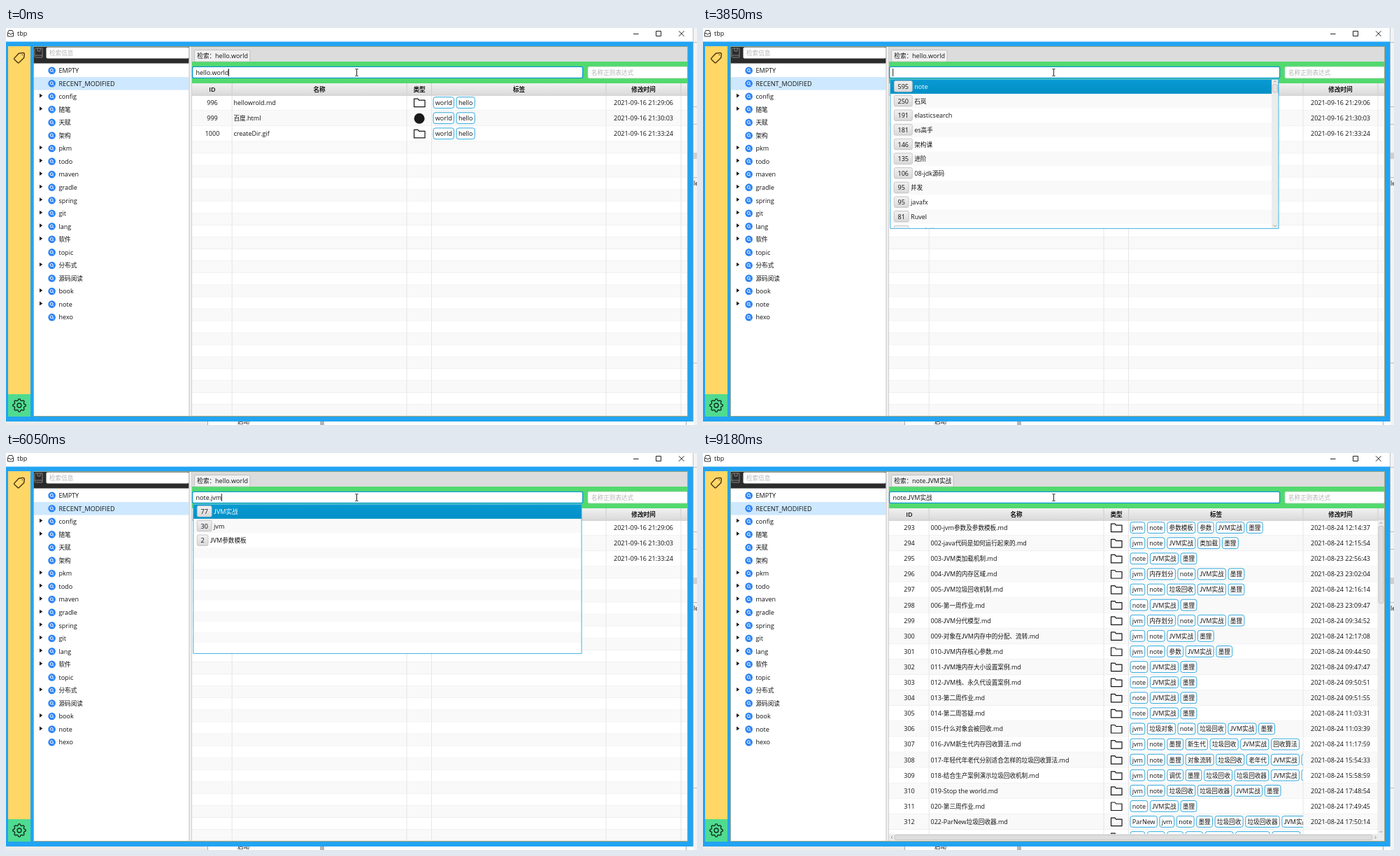
These frames come from a looping animation (988x567 px, 9510 ms). An HTML page:

```html
<!DOCTYPE html>
<html lang="zh-CN">
<head>
<meta charset="utf-8">
<style>
html, body { margin: 0; width: 100%; height: 100%; overflow: hidden; background: #fff }
svg { display: block }
text { font: 9px "Open Sans", "Noto Sans CJK SC", "Noto Sans CJK", sans-serif; fill: #111; white-space: pre }
.han { font-size: 8.6px }
.cap { font-family: Lato, sans-serif }
.bold { font-weight: 600 }
.mid { text-anchor: middle }
.hint { fill: #b4b4b4 }
.light { fill: #fff }
#probe { visibility: hidden }
</style>
</head>
<body>
<svg id="stage" width="988" height="567" viewBox="0 0 988 567">
  <defs>
    <linearGradient id="head" x2="0" y2="1"><stop stop-color="#f1f1f1"/><stop offset="1" stop-color="#d9d9d9"/></linearGradient>
    <linearGradient id="pick" x2="0" y2="1"><stop stop-color="#0a9ad2"/><stop offset="1" stop-color="#0090c6"/></linearGradient>
    <clipPath id="tagClip"><path d="M609 96h249v448H609z"/></clipPath>
    <clipPath id="bodyClip"><path d="M266 96h699v448H266z"/></clipPath>
    <clipPath id="popClip"><path d="M268 73h555v212.6H268z"/></clipPath>
  </defs>
  <text id="probe"></text>
  <g id="frame"></g>
  <g id="content"></g>
  <g fill="none" stroke="#222"><path d="M499.5 58.5h1.5l.5 .7.5-.7h1.5M501.5 59v9M499.5 68.5h1.5l.5-.7.5 .7h1.5"/></g>
</svg>
<script>
const $ = id => document.getElementById(id);

// Chinese runs are set slightly smaller; the J stands on the baseline.
const markup = s => s
  .replace(/[\u3001\u4e00-\u9fff\uff1a]+/g, '<tspan class="han">$&</tspan>')
  .replace(/J/g, '<tspan class="cap">J</tspan>');
function textWidth(s) {
  $('probe').innerHTML = markup(s);
  return s ? $('probe').getComputedTextLength() : 0;
}
const rect = (x, y, w, h, fill, extra = '') =>
  `<rect x="${x}" y="${y}" width="${w}" height="${h}" fill="${fill}" ${extra}/>`;
const path = (d, stroke, width = 1, fill = 'none') =>
  `<path d="${d}" fill="${fill}" stroke="${stroke}" stroke-width="${width}" stroke-linejoin="round"/>`;
const text = (x, y, s, cls = '') => `<text x="${x}" y="${y + 3.3}" class="${cls}">${markup(s)}</text>`;
const clip = (id, body) => `<g clip-path="url(#${id})">${body}</g>`;

// ---- window frame, sidebar and tree ----
const TREE = ('EMPTY RECENT_MODIFIED +config +随笔 天赋 架构 +pkm +todo +maven +gradle +spring ' +
  '+git +lang +软件 topic +分布式 源码阅读 +book +note hexo').split(' ');

function gear(cx, cy) {
  let d = '';
  for (let i = 0; i < 32; i++) {
    const a = (i - .5) * Math.PI / 16, r = i % 4 < 2 ? 9.2 : 7.2;
    d += (i ? 'L' : 'M') + (cx + r * Math.cos(a)).toFixed(1) + ' ' + (cy + r * Math.sin(a)).toFixed(1);
  }
  return path(d + 'z', '#14291d', 1.3) + `<circle cx="${cx}" cy="${cy}" r="3" fill="none" stroke="#14291d" stroke-width="1.3"/>`;
}

function treeItem(item, i) {
  const y = 60.7 + i * 18.55, name = item.replace('+', '');
  return (i === 1 ? rect(40, y - 9.2, 221.5, 18.5, '#cde8ff') : '') +
    (name !== item ? `<path d="M48 ${y - 4}l4.2 2.8-4.2 2.8z" fill="#111"/>` : '') +
    `<circle cx="65.6" cy="${y}" r="5.3" fill="#2d83f4"/>` +
    `<circle cx="65.2" cy="${y - .4}" r="2" fill="none" stroke="#fff"/>` +
    path(`M66.7 ${y + 1.1}l1.6 1.6`, '#fff') + text(75.5, y, name);
}

function drawFrame() {
  return rect(983, 0, 5, 567, '#f3f3f3') + rect(983, 178, 5, 9, '#cfcfcf') +
    path('M983 20.5h5M983 112.5h5M983 137.5h5M983 213.5h5M983 478.5h5', '#bbb') + text(983, 222, 'le') +
    rect(0, 562, 289, 5, '#ececec') + rect(288, 562, 1, 5, '#aaa') + text(331, 561.5, '启动') +
    rect(449, 562, 6, 5, '#b5b5b5') + rect(972, 562, 1, 5, '#aaa') +
    path('M2.5 6.5l1.5-3h5l1.5 3v5.5h-8zM2.5 7.5h2.5l.7 1.5h2l.7-1.5h2.3', '#333') + text(16, 8, 'tbp') +
    path('M897 8.5h7.5M929.5 4.5h7v7h-7zM962 4.3l7.5 7.5M969.5 4.3l-7.5 7.5', '#222') +
    rect(0, 19.5, 982.5, 542.5, '#22a4f2') + path('M982.5 0v562', '#8a9aa5', .6) +
    rect(3, 26, 32, 497, '#ffd766') + rect(3, 523, 32, 32, '#4fdb90') +
    path('M18.3 36.2l6-.8q2 0 2 1.8l-.6 5.4-7.2 6.8q-.8.8-1.7 0l-4.9-4.6q-.8-.8 0-1.7z', '#4a3314', 1.4) +
    '<circle cx="23.3" cy="38.3" r=".8" fill="#4a3314"/>' + gear(19, 539) +
    rect(39, 26.5, 936, 528, '#fff') +
    rect(39, 27, 223, 23.5, '#2b2b2b') + rect(57.5, 27.5, 204, 16, '#fff', 'rx="2"') + text(62, 35.6, '检索信息', 'hint') +
    path('M42.5 29h9.5v13h-9.5q-1.5 0-1.5-1.5v-10q0-1.5 1.5-1.5M41.5 39h10.5M45 29v4h4v-4', '#858585') +
    TREE.map(treeItem).join('') +
    rect(261.5, 27, 4.5, 527.5, '#f0f0f0') + path('M262 27v527M265.7 27v527', '#bcbcbc', .8) +
    rect(266, 27, 708.5, 22, '#dcdcdc') +
    rect(266, 48, 708.5, 31, '#52d96e') +
    rect(832, 55.2, 142.5, 16.6, '#fff', 'rx="2" stroke="#c5d5c5" stroke-width=".7"') +
    text(837, 63.4, '名称正则表达式', 'hint') +
    path('M39.5 26.5h935v528h-935z', '#9d9a67', .8);
}

// ---- table ----
const BEFORE = `996|hellowrold|world hello|09-16 21:29:06
999|百度.html|world hello|09-16 21:30:03
1000|createDir.gif|world hello|09-16 21:33:24`;
const AFTER = `293|000-jvm参数及参数模板|jvm note 参数模板 参数 JVM实战 墨狸|08-24 12:14:37
294|002-java代码是如何运行起来的|jvm note JVM实战 类加载 墨狸|08-24 12:15:54
295|003-JVM类加载机制|note JVM实战 墨狸|08-23 22:56:43
296|004-JVM的内存区域|jvm 内存划分 note JVM实战 墨狸|08-23 23:02:04
297|005-JVM垃圾回收机制|jvm note 垃圾回收 JVM实战 墨狸|08-24 12:16:14
298|006-第一周作业|note JVM实战 墨狸|08-23 23:09:47
299|008-JVM分代模型|jvm 内存划分 note JVM实战 墨狸|08-24 09:34:52
300|009-对象在JVM内存中的分配、流转|jvm note JVM实战 墨狸|08-24 12:17:08
301|010-JVM内存核心参数|jvm note 参数 JVM实战 墨狸|08-24 09:44:50
302|011-JVM堆内存大小设置案例|note JVM实战 墨狸|08-24 09:47:47
303|012-JVM栈、永久代设置案例|note JVM实战 墨狸|08-24 09:50:51
304|013-第二周作业|note JVM实战 墨狸|08-24 09:51:55
305|014-第二周答疑|note JVM实战 墨狸|08-24 11:03:31
306|015-什么对象会被回收|jvm 垃圾对象 note 垃圾回收 JVM实战 墨狸|08-24 11:03:39
307|016-JVM新生代内存回收算法|jvm note 墨狸 新生代 垃圾回收 JVM实战 回收算法|08-24 11:17:59
308|017-年轻代年老代分别适合怎样的垃圾回收算法|jvm note 墨狸 对象流转 垃圾回收 老年代 JVM实战 算法|08-24 15:54:33
309|018-结合生产案例演示垃圾回收机制|jvm note 调优 墨狸 垃圾回收 垃圾回收器 JVM实战 案例|08-24 15:58:59
310|019-Stop the world|jvm note 垃圾回收 垃圾回收器 JVM实战 墨狸|08-24 17:48:54
311|020-第三周作业|note JVM实战 墨狸|08-24 17:49:45
312|022-ParNew垃圾回收器|ParNew jvm note 墨狸 垃圾回收 垃圾回收器 JVM实战|08-24 17:50:14
313|023-CMS垃圾回收器|jvm note 墨狸 CMS 垃圾回收 垃圾回收器 JVM实战|08-24 17:52:20`;
const COLUMNS = [[295, 'ID'], [448, '名称'], [591, '类型'], [733.5, '标签'], [911.5, '修改时间']];

function tagList(names, y) {
  let x = 611;
  return names.split(' ').map(name => {
    const w = textWidth(name) + 5.6;
    const tag = rect(x, y - 8, w, 15.8, '#fff', 'rx="3" stroke="#2fa8dc"') + text(x + 2.8, y, name);
    x += w + 3.6;
    return tag;
  }).join('');
}

function tableRow(line, i) {
  const [id, name, tags, date] = line.split('|'), y = 106.7 + i * 22.1;
  const icon = name.endsWith('.html') ? `<circle cx="591" cy="${y + .5}" r="7.5" fill="#1a1a1a"/>`
    : path(`M583.5 ${y - 5.5}h5.5l1.5 2h8.5v9.5h-15.5z`, '#151515', 1.2);
  return text(295, y, id, 'mid') + text(325.5, y, /\.\w+$/.test(name) ? name : name + '.md') + icon +
    clip('tagClip', tagList(tags, y)) + text(911.5, y, '2021-' + date, 'mid');
}

function drawTable(data) {
  const lines = data.split('\n'), full = lines.length > 5;
  let out = rect(266, 96, 708.5, 458.5, '#fff');
  for (let i = 0, y = 96; y < 554; i++) {
    const h = Math.min(i < lines.length ? 22.1 : 17.08, 554 - y);
    out += rect(266, y, 708.5, h, i % 2 ? '#f9f9f9' : '#fff') + rect(266, y + h - .8, 708.5, .8, '#ededed');
    y += h;
  }
  out += rect(266, 79, 708.5, 17.3, 'url(#head)') +
    path('M323.2 79v475M573 79v475M608.5 79v475M858 79v475M965 79v475', '#e6e6e6') +
    path('M323.2 79v17M573 79v17M608.5 79v17M858 79v17M965 79v17M266 96.3h708', '#c8c8c8', .8) +
    COLUMNS.map(([x, s]) => text(x, 88, s, 'mid bold')).join('') +
    clip('bodyClip', lines.map(tableRow).join(''));
  if (full) {
    out += rect(965, 96, 9.5, 448, '#ececec') + rect(966, 104.5, 7, 110, '#dedede', 'rx="2" stroke="#bbb" stroke-width=".7"') +
      rect(266, 544, 708.5, 10, '#ececec') + rect(274, 545.5, 683, 7, '#dedede', 'rx="2" stroke="#bbb" stroke-width=".7"') +
      path('M967.5 101l2-2 2 2M967.5 540l2 2 2-2M271 547l-2 2 2 2M960.5 547l2 2-2 2', '#888', .9);
  }
  return out + path('M974.5 79v475.5H266', '#9d9a67', .8);
}

// ---- suggestion popup ----
const ALL = '595 note,250 石岚,191 elasticsearch,181 es高手,146 架构课,135 进阶,106 08-jdk源码,95 并发,95 javafx,81 Ruvel,77 JVM实战';
const UNDER_NOTE = '248 石岚,181 elasticsearch,181 es高手,146 架构课,135 进阶,106 08-jdk源码,92 并发,81 javafx,81 Ruvel,77 JVM实战,70 spring';
const HE = '30 theory,9 shell,6 hexo,3 hello,1 timingWheel,1 cache';
const H = '191 elasticsearch,' + HE;
const HEL = '9 shell,3 hello';
const JV = '77 JVM实战,30 jvm,2 JVM参数模板';
const J = '106 08-jdk源码,81 javafx,' + JV;

function drawPopup(list) {
  const items = list.split(','), pitch = 20.65, scrolls = items.length > 10;
  let body = rect(268, 73, 555, 213, '#fff');
  for (let i = 0, y = 73.3; y < 286; i++) {
    const h = i < items.length ? pitch : 15.1;
    body += rect(268, y, 555, h, i === 0 ? 'url(#pick)' : i % 2 ? '#f9f9f9' : '#fff');
    y += h;
  }
  items.forEach((item, i) => {
    const [count, name] = item.split(' '), y = 83.6 + i * pitch, w = textWidth(count) + 11;
    body += rect(273.3, y - 8, w - .5, 15.5, 'url(#head)', 'rx="2" stroke="#bdbdbd" stroke-width=".8"') +
      text(273 + w / 2, y, count, 'mid') + text(275.8 + w, y, name, i ? '' : 'light');
  });
  if (scrolls) {
    body += rect(813, 73.5, 9.5, 212.5, '#ececec') + rect(814.3, 80.5, 7, 11.5, '#e2e2e2', 'rx="2" stroke="#b5b5b5" stroke-width=".7"') +
      path('M815.8 77.5l2-2 2 2M815.8 281.5l2 2 2-2', '#888', .9);
  }
  return clip('popClip', body) + path('M267.8 73h555.2v213.4H267.8z', '#3fb4e2');
}

// ---- timeline: start ms, typed text, caret shown, suggestions ----
const STEPS = [
  [0, 'hello.world', 1], [470, 'hello.world', 0],
  [860, 'hello.worl', 1, '3 world'], [1060, 'hello.wor', 1, '3 world'], [1260, 'hello.wo', 1, '3 world'],
  [1410, 'hello.w', 1, '3 world'], [1530, 'hello.', 1, '3 world'], [1670, 'hello', 1, '3 hello'],
  [1870, 'hell', 1, HEL], [2000, 'hel', 1, HEL], [2130, 'he', 1, HE], [2330, 'h', 1, H],
  [2460, '', 1, ALL], [3360, '', 0, ALL], [3850, '', 1, ALL],
  [4040, 'note', 1], [4380, 'note.', 1, UNDER_NOTE],
  [4850, 'note.j', 1, J], [4940, 'note.jv', 1, JV], [5040, 'note.jvm', 1, JV],
  [5580, 'note.jvm', 0, JV], [6050, 'note.jvm', 1, JV],
  [6180, 'note.JVM实战', 1], [6640, 'note.JVM实战', 0], [6770, 'note.JVM实战', 1],
  [7240, 'note.JVM实战', 0], [7710, 'note.JVM实战', 1], [8190, 'note.JVM实战', 0],
  [8700, 'note.JVM实战', 1], [9180, 'note.JVM实战', 0]
];
const LOOP = 9510, LOADED = 6770;

function drawContent([start, typed, caret, list]) {
  const loaded = start >= LOADED, title = '检索：' + (loaded ? 'note.JVM实战' : 'hello.world');
  const caretX = 271.5 + textWidth(typed);
  return rect(269.5, 31.5, textWidth(title) + 6.8, 16.5, '#f1f1f1', 'rx="1.5" stroke="#b9b9b9" stroke-width=".8"') +
    text(273.3, 39.8, title) +
    rect(266.6, 55.4, 558, 16, '#fff', 'rx="2" stroke="#109bd3" stroke-width="1.4"') +
    text(271.5, 63.2, typed) + (caret ? rect(caretX - .4, 58, 1, 11, '#222') : '') +
    drawTable(loaded ? AFTER : BEFORE) + (list ? drawPopup(list) : '');
}

$('frame').innerHTML = drawFrame();
let shown;
function tick() {
  const t = performance.now() % LOOP;
  const step = STEPS.findLast(s => s[0] <= t);
  if (step !== shown) $('content').innerHTML = drawContent(shown = step);
  requestAnimationFrame(tick);
}
tick();
</script>
</body>
</html>
```
